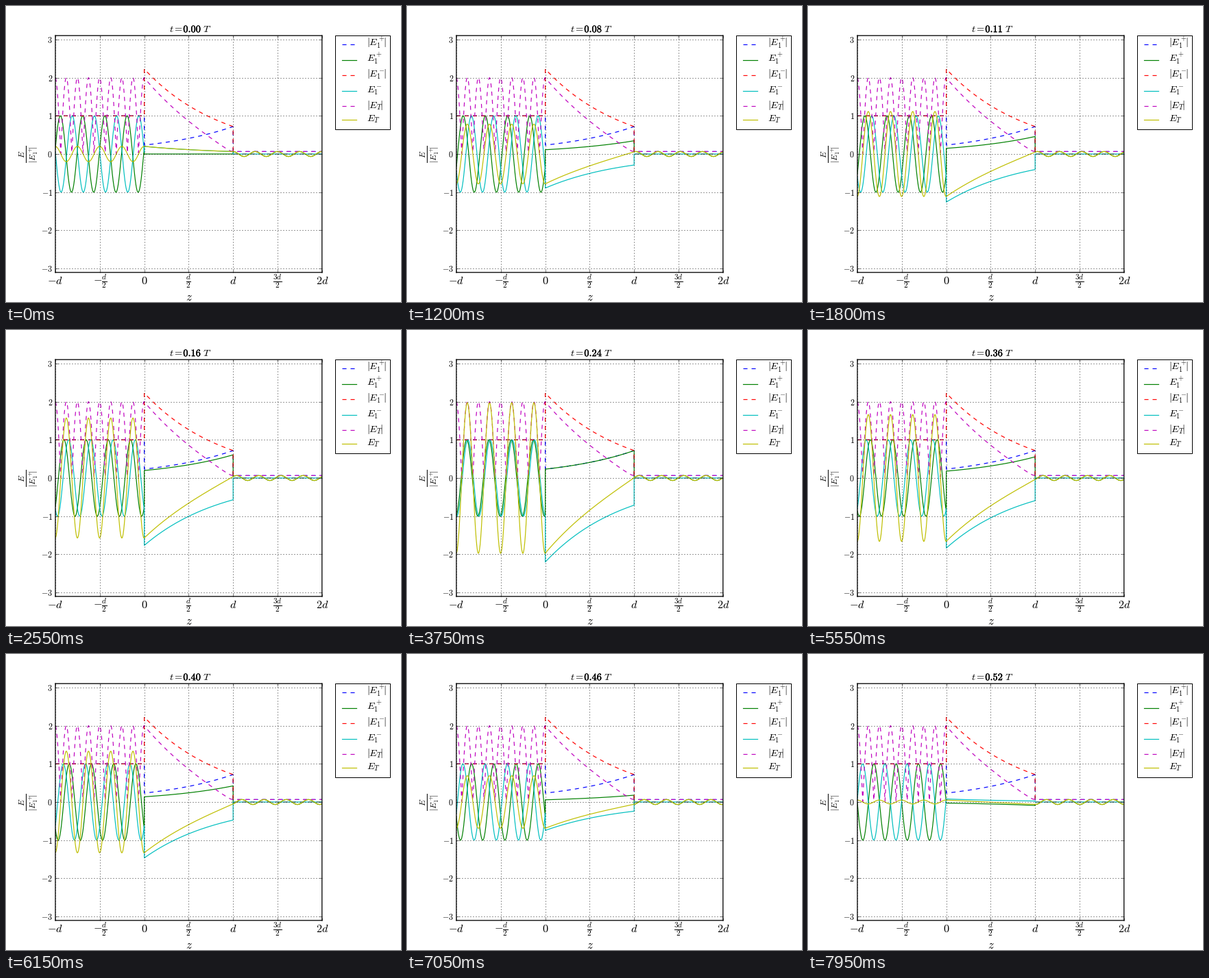
A matplotlib script for the animation above (8 s loop, 576x432 px).

```python
import numpy as np
import matplotlib.pyplot as plt
from matplotlib.animation import FuncAnimation
from matplotlib.lines import Line2D
from matplotlib.patches import Rectangle
from matplotlib.patheffects import withStroke

W, H, DPI = 576, 432, 72
plt.rcParams.update({
    "mathtext.fontset": "cm", "lines.scale_dashes": False,
    "lines.dashed_pattern": (6, 6), "lines.dotted_pattern": (1, 3),
    "lines.linewidth": 1.2, "axes.axisbelow": False,
})

# Plane wave on an evanescent slab 0 < z < d (d = 1), same medium on both sides
K = 8 * np.pi
GAMMA = 1.13
RHO = GAMMA / K

T = 2 / (2 * np.cosh(GAMMA) + 1j * (1 / RHO - RHO) * np.sinh(GAMMA))
A = T * (1 - 1j / RHO) / 2 * np.exp(-GAMMA)
B = T * (1 + 1j / RHO) / 2 * np.exp(GAMMA)
REFLECTION = A + B - 1
PHASE = np.abs(A) / A      # makes the growing slab wave real

left, slab, right = np.linspace(-1, 0, 500), np.linspace(0, 1, 200), np.linspace(1, 2, 400)
z = np.concatenate([left, slab, right])
forward = PHASE * np.concatenate([
    np.exp(-1j * K * left), A * np.exp(GAMMA * slab), T * np.exp(-1j * K * (right - 1))])
backward = PHASE * np.concatenate([
    REFLECTION * np.exp(1j * K * left), B * np.exp(-GAMMA * slab), 0 * right])

# wave, plain name, name inside bars, dashed colour, solid colour
WAVES = [
    (forward, "E_1^+", r"E_1^+\!\!", "b", "g"),
    (backward, "E_1^-", r"E_1^-\!\!", "r", "c"),
    (forward + backward, "E_T", r"E_T\!", "m", "y"),
]

fig = plt.figure(figsize=(W / DPI, H / DPI), dpi=DPI, facecolor="white")
ax = fig.add_axes([0.125, 0.1, 0.675, 0.8])
ax.set_xlim(-1, 2)
ax.set_ylim(-3.1, 3.1)

half = r"\frac{%s}{2}"
ax.set_xticks(np.arange(-1, 2.1, 0.5), [
    "$-d$", f"$-{half % 'd'}$", "$0$", f"${half % 'd'}$", "$d$", f"${half % '3d'}$", "$2d$"])
ax.set_yticks(range(-3, 4), [f"${n}$" for n in range(-3, 4)])
ax.tick_params(direction="in", length=4, width=0.5, top=True, right=True)
ax.tick_params(axis="x", pad=17, labelsize=16.3)
ax.tick_params(axis="y", pad=4, labelsize=12)
for label in ax.get_xticklabels():
    label.set_va("baseline")
ax.grid(color="k", linestyle=":", linewidth=0.8)
for spine in ax.spines.values():
    spine.set_linewidth(1.3)
    spine.set_snap(False)


def px(x, y):
    return x / W, 1 - y / H


def put_text(x, y, text, size, **kw):
    return fig.text(*px(x, y), text, fontsize=size, **{"va": "baseline", **kw})


put_text(238, 38.2, "$t=$", 14.4)
clock = put_text(258.3, 38.2, "", 14.4, path_effects=[withStroke(linewidth=0.4, foreground="k")])
put_text(287, 38.2, "$T$", 14.4)
put_text(266.5, 430, "$z$", 17, ha="center")
put_text(33, 216, r"$\frac{E}{|E_1^+\!\!|}$", 17.3, ha="center", va="center", rotation=90)

fig.add_artist(Rectangle(px(480, 179.5), 79.5 / W, 136.5 / H, fc="w", ec="k", lw=1))


def legend_row(y, text, color, style):
    (x0, y0), (x1, _) = px(490, y), px(511, y)
    fig.add_artist(Line2D([x0, x1], [y0, y0], color=color, ls=style))
    put_text(525.5, y + 2.6, text, 14.4)


rows = iter([56, 78.5, 101, 123.5, 146, 166])
moving = []
for wave, name, barred, dashed, solid in WAVES:
    ax.plot(z, np.abs(wave), color=dashed, ls="--")
    line, = ax.plot(z, wave.imag, color=solid)
    moving.append((line, wave))
    legend_row(next(rows), f"$|{barred}|$", dashed, "--")
    legend_row(next(rows), f"${name}$", solid, "-")


def time_at(step):
    # the end of the period (1.00) is played right after 0.10
    if step == 11:
        return 1.0
    return (step - (step > 11)) / 100


def update(frame):
    t = time_at(frame // 3)
    turn = np.exp(2j * np.pi * t)
    for line, wave in moving:
        line.set_ydata((wave * turn).imag)
    clock.set_text(rf"$\mathbf{{{t:.2f}}}$")
    return [line for line, _ in moving] + [clock]


anim = FuncAnimation(fig, update, frames=160, interval=50, repeat=True, repeat_delay=0)
plt.show()
```
